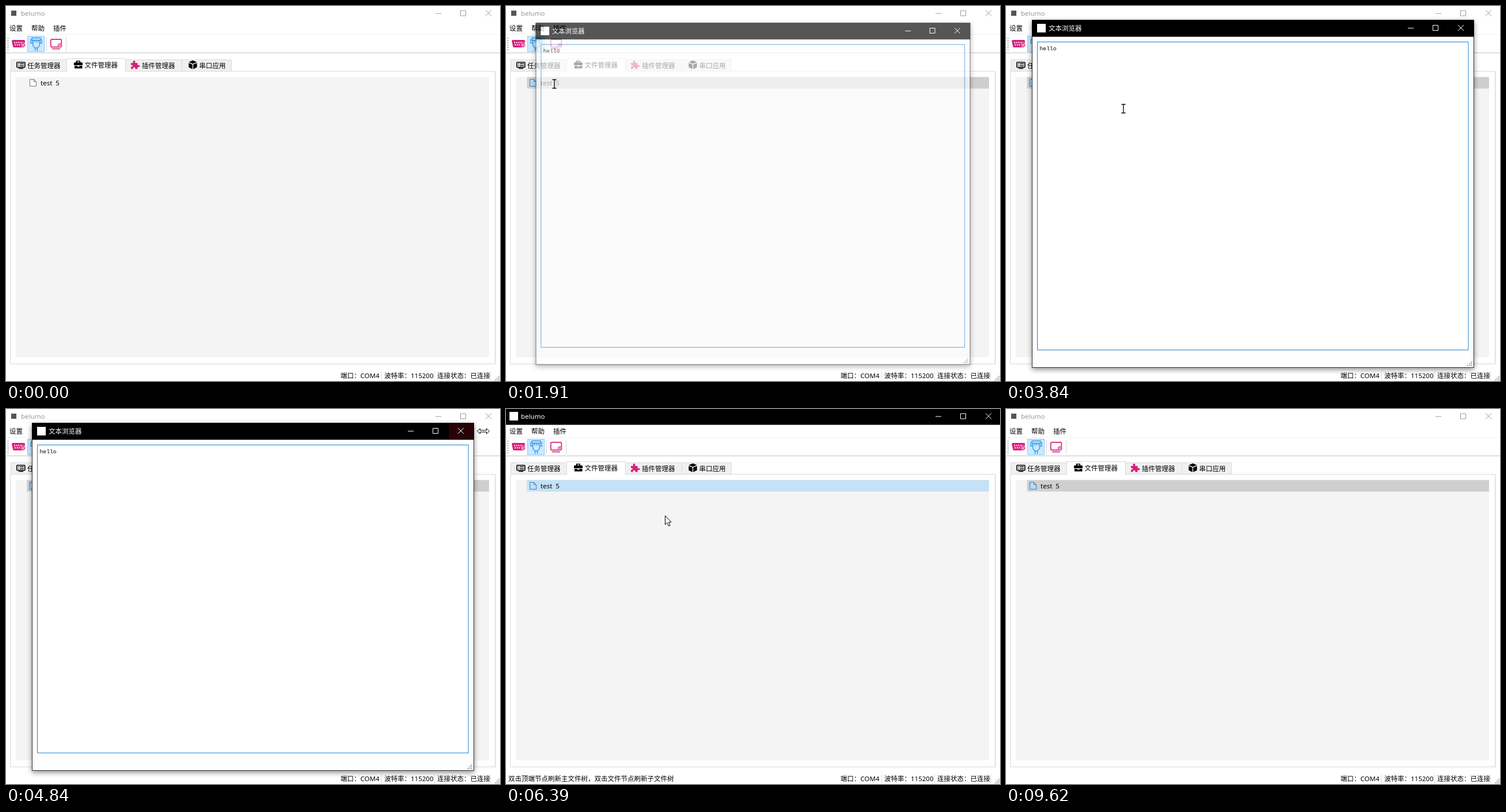
An HTML page for the animation above (9690 ms loop, 858 by 652 pixels).

```html
<!DOCTYPE html>
<html lang="zh-CN">
<head>
<meta charset="utf-8">
<title>文件管理器</title>
<style>
html, body { margin: 0; width: 100%; height: 100%; overflow: hidden; background: #fff; }
svg { display: block; }
text { font: 11.5px "Noto Sans", "Noto Sans CJK SC", sans-serif; white-space: pre; }
.hello { font: 9.7px "Liberation Mono", monospace; }
.line { fill: none; stroke: currentColor; }
.pink { color: #d6217c; }
.blue { color: #2997e3; }
</style>
</head>
<body>
<svg width="858" height="652" viewBox="0 0 858 652">
  <defs>
    <path id="buttons" class="line" d="M-92 .5h10M-48.500-4.500h9v9h-9zM-5-5l10 10M5-5l-10 10"/>
    <path id="grip" fill="#aaa" d="M0 6h2v2h-2zM3 6h2v2h-2zM6 6h2v2h-2zM3 3h2v2h-2zM6 3h2v2h-2zM6 0h2v2h-2z"/>
    <g id="gear">
      <circle r="3.600" fill="#fff"/>
      <circle r="3" class="line" stroke-width="1.800" stroke-dasharray="1.700 .7"/>
      <circle r="1.300" class="line" stroke-width=".8"/>
    </g>
    <filter id="shadow" x="-5%" y="-5%" width="110%" height="112%">
      <feDropShadow dx="0" dy="3" stdDeviation="5" flood-opacity=".45"/>
    </filter>
  </defs>

  <rect width="858" height="652" fill="#fff"/>
  <rect id="titleBar" width="858" height="27.500"/>
  <rect id="appIcon"/>
  <text id="appName" x="26" y="17">belumo</text>
  <g id="mainButtons"><use href="#buttons" x="838" y="12.500"/></g>

  <text x="6" y="43">设置</text>
  <text x="44" y="43">帮助</text>
  <text x="82" y="43">插件</text>
  <path d="M0 49.500h858" stroke="#f0f0f0"/>
  <path d="M0 81.500h858" stroke="#c3c3c3"/>
  <path d="M3.500 55v23" stroke="#aaa" stroke-width="2" stroke-dasharray="2 2"/>
  <path d="M70.500 54v24M104.500 54v24" stroke="#d8d8d8"/>

  <g class="pink">
    <path d="M12 59h19q2 0 2 2l-2 9q-.5 2-2 2H14q-2 0-2-2l-2-9q0-2 2-2z" fill="currentColor"/>
    <path d="M14 63.500h16M15 67.500h12" stroke="#fff" stroke-width="2" stroke-dasharray="2 1.700"/>
    <use href="#gear" x="29.500" y="68"/>
    <rect x="77.800" y="57.800" width="18.500" height="13.500" rx="2" class="line" stroke-width="1.700"/>
    <path d="M80 74.500h14" class="line" stroke-width="1.600"/>
    <use href="#gear" x="93.500" y="68.500"/>
  </g>
  <rect x="37.500" y="52.500" width="29" height="27" fill="#cce8ff" stroke="#90c8f6"/>
  <path class="line blue" stroke-width="1.300" d="M45 55.500h15v4H45zM43 57.500v7h3M62 57.500v7h-3M46 59.500l1 10 3.500 3.500h4l3.500-3.500 1-10M50.500 73v5M54.500 73v5M49 59.500v4M52.500 59.500v4M56 59.500v4"/>

  <rect x="7.500" y="113.500" width="842" height="508.500" fill="#fff" stroke="#d9d9d9"/>
  <path d="M850.500 114v509H8" class="line" stroke="#eee" style="color:#eee"/>
  <path d="M8.500 113.500v-20h97v20zM207.500 113.500v-20h98v20zM305.500 113.500v-20h86v20z" fill="#f0f0f0" stroke="#d9d9d9"/>
  <path d="M105.500 114.500v-23h102v23" fill="#fff" stroke="#d9d9d9"/>
  <path d="M106 114h101" stroke="#fff" stroke-width="2"/>

  <rect x="18.800" y="97.800" width="14" height="9" rx="1" class="line" stroke-width="1.600"/>
  <path d="M21 100.500h1.500M24 100.500h7M21 104h1.500M24 104h7M22 108.500h8" class="line" stroke-width="1.400"/>
  <path d="M122 98v-3h7v3h2.500q1.500 0 1.500 1.500V103h-15v-3.500q0-1.500 1.500-1.500zM124 96.500V98h3.500v-1.500zM119 104h5v1.500h3.500V104h5v4.500h-13.500z" fill-rule="evenodd"/>
  <path class="pink" fill="currentColor" d="M217 99h4q-1.500-4 1.500-4t1.500 4h4.500v4q4-1 4 1.500t-4 1.500v3.500h-4q0-3-2-3t-2 3h-3.500v-4q3 0 3-1.500t-3-1.500z"/>
  <path d="M324.500 94.500l7 3-7 3-7-3zM317.300 99l6.500 2.800v8l-6.500-3.300zM331.700 99l-6.500 2.800v8l6.500-3.300z"/>
  <text x="37" y="107.500">任务管理器</text>
  <text x="136.500" y="106.500">文件管理器</text>
  <text x="236" y="107.500">插件管理器</text>
  <text x="335.500" y="107.500">串口应用</text>

  <rect x="17" y="123.500" width="822" height="487" fill="#f4f4f4"/>
  <rect id="row" x="36.500" y="123.500" width="802.500" height="20"/>
  <path id="fileIcon" d="M41.500 127.500h7l4 4v8h-11zM48.500 127.500v4h4"/>
  <text x="60" y="138">test  5</text>

  <text id="status" x="4" y="647">双击顶端节点刷新主文件树，双击文件节点刷新子文件树</text>
  <text x="581" y="647">端口：</text><text x="615.500" y="647">COM4</text>
  <text x="657" y="647">波特率：</text><text x="703" y="647">115200</text>
  <text x="749" y="647">连接状态：已连接</text>
  <path d="M652.500 635v16M744.500 635v16M841.500 635v16" stroke="#ddd"/>
  <use href="#grip" x="849" y="643"/>

  <g id="dialog">
    <rect x="45.500" y="24.500" width="767" height="604" fill="#fefefe" stroke="#333" filter="url(#shadow)"/>
    <rect x="45" y="24" width="768" height="29.500"/>
    <rect x="54" y="31" width="15" height="15" fill="#fff"/>
    <text x="74" y="43" fill="#fff">文本浏览器</text>
    <rect id="closeButton" x="769" y="24.500" width="43" height="29"/>
    <g color="#fff"><use href="#buttons" x="790" y="38"/></g>
    <rect x="54.500" y="62.500" width="748.500" height="535.500" fill="#fff" stroke="#1a80d5"/>
    <text class="hello" x="58.500" y="76.500">hello</text>
    <use href="#grip" x="801" y="618"/>
  </g>

  <g id="cursor" stroke="#000" fill="#fff">
    <path id="arrow" d="M.5.500v15.500l3.500-3.300 2.600 5.800 2.400-1-2.500-5.700H11z"/>
    <path id="beam" fill="none" stroke-width="1.300" d="M-3.500-7h2.500q1 0 1 1V7q0 1-1 1h-2.500M3.500-7H1q-1 0-1 1V7q0 1 1 1h2.500"/>
    <path id="resize" d="M-10.500.500l5-4.500v3h11v-3l5 4.500-5 4.500V2h-11v3z"/>
  </g>
</svg>
<script>
const LOOP = 9690, START = 280, STEP = 77.19;

// Pointer path: [step, x, y]
const path = [
  [0, 560, 430], [7, 83, 124], [10, 82, 125], [11, 82, 125], [13, 82, 135],
  [20, 84, 135], [32, 84, 135], [33, 105, 102], [35, 116, 88], [38, 70, 72],
  [40, 48, 62], [41, 48, 62], [46, 204, 178], [54, 632, 85], [57, 781, 42],
  [58, 816, 39], [59, 829, 38], [62, 793, 42], [73, 793, 42], [79, 276, 185],
  [84, 276, 185], [86, 278, 191], [88, 278, 191], [95, 179, 175],
  [96, 179, 175], [99, 159, 172], [109, 159, 172], [118, 806, 634]
];
// Dialog phases: [step, opacity, scale]
const phases = [
  [-1, 0, 1], [20, .25, .95], [21, .66, .983], [22, .92, .996], [23, 1, 1],
  [70, .6, .97], [71, .2, .94], [72, 0, 1]
];

const el = id => document.getElementById(id);
const set = (id, attrs) => {
  for (const name in attrs) el(id).setAttribute(name, attrs[name]);
};
const show = (id, on) => set(id, { visibility: on ? "visible" : "hidden" });
const inside = ([x, y], left, top, right, bottom) =>
  x >= left && x < right && y >= top && y < bottom;

function pointerAt(step) {
  const i = path.findIndex(key => key[0] > step);
  if (i < 1) return (i ? path.at(-1) : path[0]).slice(1);
  const [s0, x0, y0] = path[i - 1], [s1, x1, y1] = path[i];
  const k = (step - s0) / (s1 - s0);
  return [Math.round(x0 + (x1 - x0) * k), Math.round(y0 + (y1 - y0) * k)];
}

function draw(time) {
  const step = Math.max(-1, Math.floor((time - START) / STEP + .03));
  const pointer = pointerAt(step);
  const present = step >= 0 && step < 118;
  const modal = step >= 20 && step < 70;
  const selected = step >= 16;
  const active = selected && !modal && step < 121;
  const hovered = present && !modal && inside(pointer, 37, 124, 839, 144);

  set("titleBar", { fill: active ? "#000" : "#fff" });
  set("appName", { fill: active ? "#fff" : "#999" });
  set("mainButtons", { color: active ? "#fff" : "#999" });
  set("appIcon", active
    ? { x: 6, y: 5, width: 15, height: 15, fill: "#fff" }
    : { x: 9, y: 8, width: 9, height: 9, fill: "#555" });

  set("row", { fill: active ? "#c4e1f6" : selected ? "#cfcfcf" : hovered ? "#dbe9f5" : "none" });
  set("fileIcon", {
    fill: active ? "#c0dff7" : selected ? "#b5daf7" : "#fff",
    stroke: selected ? "#4380b5" : "#777"
  });
  show("status", present && !modal && inside(pointer, 17, 124, 839, 611));

  const [, opacity, scale] = phases.findLast(phase => phase[0] <= step);
  set("dialog", {
    opacity,
    transform: `translate(429 326) scale(${scale}) translate(-429 -326)`
  });
  const onClose = modal && inside(pointer, 769, 24, 812, 54);
  set("closeButton", {
    fill: step >= 68 ? "#f1707a" : "#e81123",
    opacity: onClose || step >= 70 ? 1 : { 58: .55, 59: .17 }[step] || 0
  });

  const shape = modal && inside(pointer, 55, 63, 803, 598) ? "beam"
    : modal && pointer[0] > 812 ? "resize" : "arrow";
  for (const id of ["arrow", "beam", "resize"]) show(id, present && id === shape);
  set("cursor", { transform: `translate(${pointer})` });
}

const begin = performance.now();
function tick() {
  draw((performance.now() - begin) % LOOP);
  requestAnimationFrame(tick);
}
tick();
</script>
</body>
</html>
```
